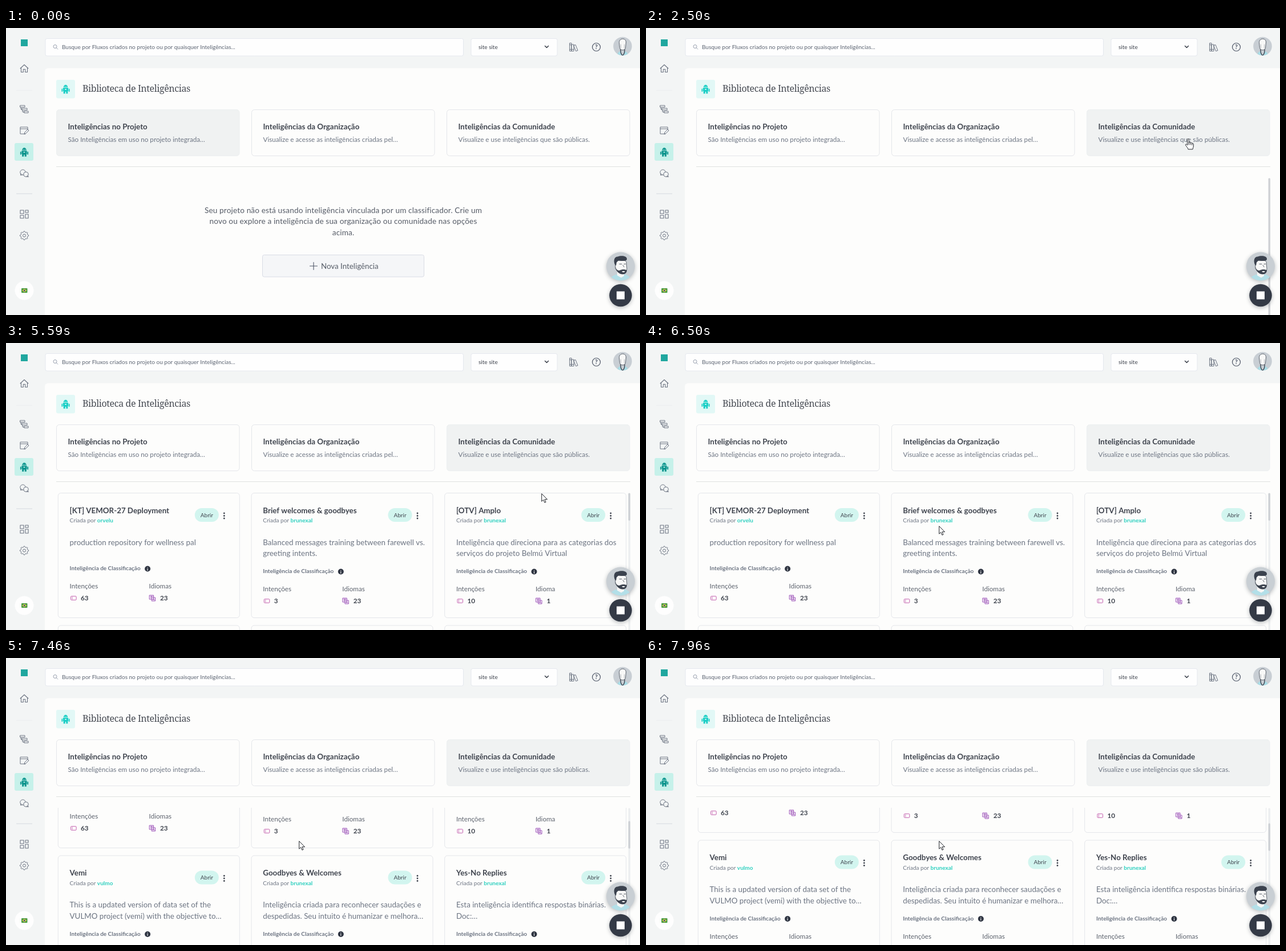
Write an HTML page with a canvas that moves like this. It is 1111 px wide and 504 px high and loops after 8 s.

```html
<!DOCTYPE html>
<html lang="pt-BR">
<head>
<meta charset="utf-8">
<title>Biblioteca de Inteligências</title>
<style>
html, body { margin: 0; width: 100%; height: 100%; overflow: hidden; background: #f3f5f5; }
canvas { display: block; width: 1111px; height: 504px; }
</style>
</head>
<body>
<canvas id="stage" width="1111" height="504"></canvas>
<script>
const ctx = document.getElementById('stage').getContext('2d');
const LOOP = 8000;
const LATO = 'Lato, "Open Sans", sans-serif';
const SERIF = '"Noto Serif", serif';
const INK = '#3f444e', SOFT = '#6c7482', LINE = '#e4e6ea';
const PAGE = '#fdfdfc', SIDE = '#f3f5f5', TEAL = '#1ccfc6';

const TABS = [
  [88, 'Inteligências no Projeto', 'São Inteligências em uso no projeto integrada…'],
  [430, 'Inteligências da Organização', 'Visualize e acesse as inteligências criadas pel…'],
  [772, 'Inteligências da Comunidade', 'Visualize e use inteligências que são públicas.']
];

const CARDS = [
  { title: '[KT] VEMOR-27 Deployment', by: 'orvelu', text: ['production repository for wellness pal'], intents: 63, langs: 23 },
  { title: 'Brief welcomes & goodbyes', by: 'brunexal', text: ['Balanced messages training between farewell vs.', 'greeting intents.'], intents: 3, langs: 23 },
  { title: '[OTV] Amplo', by: 'brunexal', text: ['Inteligência que direciona para as categorias dos', 'serviços do projeto Belmú Virtual'], intents: 10, langs: 1 },
  { title: 'Vemi', by: 'vulmo', text: ['This is a updated version of data set of the', 'VULMO project (vemi) with the objective to…'], intents: 12, langs: 2 },
  { title: 'Goodbyes & Welcomes', by: 'brunexal', text: ['Inteligência criada para reconhecer saudações e', 'despedidas. Seu intuito é humanizar e melhora…'], intents: 2, langs: 2 },
  { title: 'Yes-No Replies', by: 'brunexal', text: ['Esta inteligência identifica respostas binárias.', 'Doc:…'], intents: 2, langs: 2 }
];

const clamp = v => Math.min(1, Math.max(0, v));
const ramp = (t, a, b) => clamp((t - a) / (b - a));
const ease = p => p * p * (3 - 2 * p);
const mix = (a, b, p) => a + (b - a) * p;

function text(str, x, y, size, color, weight = 400, align = 'left', spacing = 0, family = LATO) {
  ctx.font = `${weight} ${size}px ${family}`;
  ctx.letterSpacing = spacing + 'px';
  ctx.textAlign = align;
  ctx.fillStyle = color;
  ctx.fillText(str, x, y);
  ctx.letterSpacing = '0px';
}

function paint(fill, stroke, width = 1) {
  if (fill) { ctx.fillStyle = fill; ctx.fill(); }
  if (stroke) { ctx.strokeStyle = stroke; ctx.lineWidth = width; ctx.stroke(); }
}

function box(x, y, w, h, r, fill, stroke, width) {
  ctx.beginPath();
  ctx.roundRect(x, y, w, h, r);
  paint(fill, stroke, width);
}

function disc(x, y, r, fill, stroke, width) {
  ctx.beginPath();
  ctx.arc(x, y, r, 0, Math.PI * 2);
  paint(fill, stroke, width);
}

function shape(d, x, y, fill, stroke, width) {
  ctx.save();
  ctx.translate(x, y);
  const p = new Path2D(d);
  if (fill) { ctx.fillStyle = fill; ctx.fill(p); }
  if (stroke) {
    ctx.strokeStyle = stroke;
    ctx.lineWidth = width || 1;
    ctx.lineJoin = ctx.lineCap = 'round';
    ctx.stroke(p);
  }
  ctx.restore();
}

function hline(x1, x2, y, color) {
  ctx.fillStyle = color;
  ctx.fillRect(x1, y, x2 - x1, 1);
}

function robot(x, y, color, back) {
  shape('M-3.7-3.2A3.7 4.6 0 0 1 3.7-3.2Z M-4.6-2.4H4.6V3.6H3.8V7.8H.8V4.6H-.8V7.8H-3.8V3.6H-4.6Z', x, y, color);
  shape('M-6.2 0V3.6 M6.2 0V3.6', x, y, null, color, 1.8);
  disc(x - 1.4, y - 4.7, 0.6, back);
  disc(x + 1.4, y - 4.7, 0.6, back);
  box(x - 1.5, y - 0.4, 3, 1.4, 0.5, back);
}

function gear(x, y) {
  ctx.beginPath();
  for (let i = 0; i < 32; i++) {
    const a = (i - 0.5) / 32 * Math.PI * 2, r = i % 4 < 2 ? 7.6 : 5.9;
    ctx.lineTo(x + Math.cos(a) * r, y + Math.sin(a) * r);
  }
  ctx.closePath();
  paint(null, SOFT);
  disc(x, y, 2.5, null, SOFT);
}

function sidebar() {
  box(26, 20, 12, 12, 0, '#20a79f');
  shape('M-7 0L0-6.5L7 0 M-5.5-1V6.5H-1.7V1.5H1.7V6.5H5.5V-1', 32, 71, null, SOFT, 1.1);
  hline(18, 46, 109, '#eceef0');
  shape('M-7-6.5H1V-3.5H-7Z M-4-1.5H5V1.5H-4Z M0 3.5H7V6.5H0Z M-6-3.5V0H-4 M-3 1.5V5H0', 32, 142.5, null, SOFT);
  shape('M2 6H-7V-6H6V-2 M-7-3H6 M0 6L1 3L6-2L8 0L3 5Z', 32, 180, null, SOFT);
  box(15, 202, 33, 31, 3, '#c6f1ea');
  robot(32, 218, '#0c958d', '#c6f1ea');
  disc(29.5, 253.5, 4.7, null, SOFT);
  shape('M-1 0L-1.5 3L2 1.8', 27, 255.5, null, SOFT);
  disc(35, 257, 4.1, SIDE, SOFT);
  shape('M0 0L2 2.3L-1.5 2', 37.5, 259, null, SOFT);
  hline(18, 46, 290.5, '#d6dae0');
  shape('M-7-7H-1V-1H-7Z M2-7H7V-3H2Z M2 0H7V7H2Z M-7 2H-1V7H-7Z', 32, 327, null, SOFT, 1.1);
  gear(32, 364.5);
  disc(32, 461, 16.5, '#fefefe');
  box(27, 457, 10.5, 8, 1, '#4b9b43');
  shape('M-4 0L0-3L4 0L0 3Z', 32.2, 461, '#e6cf45');
  disc(32.2, 461, 1.5, '#35558c');
}

function header() {
  box(69, 18.5, 732.5, 30.5, 3, '#fefefe', '#e5e8ee');
  disc(86, 32.5, 3, null, '#8d96a5', 0.9);
  shape('M0 0L2.5 2.5', 88.2, 34.7, null, '#8d96a5', 0.9);
  text('Busque por Fluxos criados no projeto ou por quaisquer Inteligências...', 98, 37, 10, '#5c6472');
  box(815, 18.5, 151, 30.5, 3, '#fefefe', '#e5e8ee');
  text('site site', 828, 37, 10, INK);
  shape('M-3-1.5L0 1.5L3-1.5', 947.5, 33, null, INK, 1.6);

  shape('M-7-7H-4V7H-7Z M-4-4.5H0V7H-4Z M0-3L3-4L7 6L4 7Z M-7 4H0 M-7-4H-4', 995, 33.5, null, SOFT);
  disc(1034.5, 33.5, 7, null, '#4e5666', 1.2);
  text('?', 1034.5, 37.3, 10.5, '#4e5666', 700, 'center');

  ctx.save();
  disc(1080.5, 32, 16.3, '#c8ced4');
  ctx.clip();
  shape('M-10 18C-9 10-5 8 0 8S9 10 10 18Z', 1080.5, 32, '#a8dbe4');
  shape('M-4 3H4L3 12L0 17L-3 12Z', 1080.5, 32, '#c9ced3', '#3b4350', 1.4);
  shape('M-6-7C-6-15 6-15 6-7L5 3C4 8-4 8-5 3Z', 1080.5, 32, '#f8f8f7', '#59616c', 1);
  shape('M-3-3V3 M3-3V3', 1080.5, 32, null, '#b4b9bf', 0.9);
  ctx.restore();
}

function tabs(active) {
  TABS.forEach(([x, title, note], i) => {
    const on = i === active;
    box(x + 0.5, 143.5, 320.5, 81, 5, on ? '#f0f2f2' : PAGE, on ? '#eceff0' : LINE);
    text(title, x + 20.5, 178, 13.33, INK, 700);
    text(note, x + 20.5, 200, 11.67, SOFT);
  });
  hline(88, 1094, 243, '#dfe2e0');
}

function emptyState(alpha) {
  if (alpha <= 0) return;
  ctx.globalAlpha = alpha;
  ['Seu projeto não está usando inteligência vinculada por um classificador. Crie um',
   'novo ou explore a inteligência de sua organização ou comunidade nas opções',
   'acima.'].forEach((s, i) => text(s, 591, 324.5 + i * 19.7, 13.6, '#565c67', 400, 'center', 0.14));
  box(449.5, 398.5, 283, 38.5, 3, '#f5f6f8', '#d9dce5');
  shape('M-6.5 0H6.5M0-6.5V6.5', 539, 418, null, '#4e5666', 1.1);
  text('Nova Inteligência', 552, 422.7, 13.33, '#565c67');
  ctx.globalAlpha = 1;
}

function stat(x, y, label, value, isLang) {
  text(label, x, y, 11.67, '#5d636e');
  const cy = y + 17;
  if (isLang) {
    shape('M-5-5H2V2H-5Z M-1-1H5V5H-1Z M-3.5-3H0.5 M-1.5-3.5L-3 0 M1 3.5L2 1L3.5 3.5', x + 6, cy, null, '#9b50b8');
  } else {
    box(x + 2, cy - 3.3, 9.5, 6.6, 1, null, '#c45fae');
    shape('M0-2V2', x + 4.5, cy, null, '#c45fae', 0.8);
  }
  text(value, x + 19.5, y + 21, 11.67, INK, 700);
}

function card(c, x, y) {
  box(x, y, 318, 219, 5, PAGE, LINE);
  const tx = x + 20.3, low = y + (c.text.length > 1 ? 5 : 0);
  text(c.title, tx, y + 35.3, 13.33, INK, 700);
  text('Criada por ', tx, y + 51.5, 10, SOFT);
  text(c.by, tx + ctx.measureText('Criada por ').width, y + 51.5, 10, '#2fd0c0', 700);
  box(x + 239.5, y + 26.5, 42, 24, 12, '#d2f5ef');
  text('Abrir', x + 260.5, y + 42, 10, INK, 400, 'center');
  [35.5, 40, 44.5].forEach(d => disc(x + 291, y + d, 1.4, INK));
  c.text.forEach((s, i) => text(s, tx, y + 91.2 + i * 19.6, 13.33, SOFT));

  text('Inteligência de Classificação', tx, low + 135.5, 10, SOFT, 700);
  disc(tx + 136.5, low + 133, 5, '#2f3542');
  text('i', tx + 136.5, low + 136, 8, '#fff', 700, 'center');
  stat(tx, low + 167.5, 'Intenções', c.intents, false);
  stat(tx + 139, low + 167.5, c.langs === 1 ? 'Idioma' : 'Idiomas', c.langs, true);
}

function cardList(alpha, scroll) {
  ctx.save();
  ctx.beginPath();
  ctx.rect(85, 263, 1026, 241);
  ctx.clip();
  ctx.globalAlpha = alpha;
  CARDS.forEach((c, i) => card(c, 91.3 + i % 3 * 338.7, 263.5 + Math.floor(i / 3) * 232.5 - scroll));
  ctx.restore();
}

function scrollbar(loaded, scroll) {
  box(1090.5, 263.5, 3.5, 250, 2, loaded ? '#edeff0' : '#d0d2d6');
  if (loaded) box(1090.5, 263.5 + scroll * 0.152, 3.5, 48.5, 2, '#cfd2d6');
}

function shadowDisc(x, y, r, fill) {
  ctx.save();
  ctx.shadowColor = 'rgba(40,50,60,.32)';
  ctx.shadowBlur = 7;
  ctx.shadowOffsetY = 2;
  disc(x, y, r, fill);
  ctx.restore();
}

function floaters() {
  shadowDisc(1077, 418.5, 25, '#c9cfd4');
  ctx.save();
  disc(1077, 418.5, 25);
  ctx.clip();
  shape('M-20 26C-17 17-11 15-5 14H7C14 16 17 20 19 26Z', 1077, 418.5, '#b3dfe8');
  shape('M-6 4H6V17L1 20L-6 16Z', 1077, 418.5, '#f6f6f5');
  shape('M-9-8C-4-12 7-12 10-8L11 5C9 14-4 14-9 4Z', 1077, 418.5, '#f8f8f7', '#454c58', 0.8);
  shape('M-10-3C-13-10-11-17-5-17C0-19 11-19 11-13C11-9 6-9-4-10L-7-7L-8-1Z', 1077, 418.5, '#3b424e');
  shape('M-9 0C-8 6-5 8-1 7C2 5 8 5 11 7C11 11 8 14 4 14C-3 14-9 8-9 0Z', 1077, 418.5, '#3b424e');
  shape('M2 9C4 8 6 8 8 9C6 11 4 11 2 9Z', 1077, 418.5, '#f8f8f7');
  shape('M-2-4H2 M6-4H9 M4-2L6 1', 1077, 418.5, null, '#454c58', 0.9);
  ctx.restore();
  shadowDisc(1077, 469.5, 19.8, '#343a46');
  box(1070, 462.5, 14, 14, 0, '#fdfdfd');
}

function arrow(x, y) {
  shape('M0 0V13.2L3 10.4L5.2 15.3L7.3 14.4L5.2 9.7H9.4Z', x + 0.7, y, '#fff', '#22252b', 1);
}

function hand(x, y) {
  shape('M-1.5 1C-1.5-1 1.2-1 1.2 1V6.5C1.4 5 4 5 4 7C4.5 5.7 6.8 6 6.8 7.8C7.5 6.9 9.3 7.3 9.3 9V13C9.3 15 8 16 8 18H0C0 16-3 13-4.5 10.8C-5.2 9.3-3.5 8.4-2.5 9.5L-1.5 10.6Z M1.2 6.5V10 M4 7V10 M6.8 8V10.5', x, y, '#fff', '#22252b', 1);
}

function cursor(t) {
  if (t < 40) return;
  let x, y;
  if (t < 3750) {
    const p = ease(ramp(t, 0, 1040));
    x = mix(720, 950, p);
    y = mix(508, 194.5, p);
  } else if (t < 6000) {
    const p = ease(ramp(t, 3750, 3960));
    x = mix(950, 938, p);
    y = mix(194.5, 265, p);
  } else {
    const p = ease(ramp(t, 6210, 6470));
    x = mix(938, 513, p);
    y = mix(265, 322, p);
  }
  (y < 225 ? hand : arrow)(Math.round(x), Math.round(y));
}

function draw(t) {
  const picked = t >= 1590;
  const loaded = t >= 5250;
  const scroll = t < 6994 ? 0 : Math.round(181 * (1 - Math.exp((6994 - t) / 269)));

  ctx.fillStyle = SIDE;
  ctx.fillRect(0, 0, 1111, 504);
  box(68, 70.5, 1060, 460, [6, 0, 0, 0], PAGE);
  sidebar();
  header();

  box(88, 91, 33, 32.5, 3, '#e2f8f6');
  robot(104.5, 107.5, TEAL, '#e2f8f6');
  text('Biblioteca de Inteligências', 134, 111.7, 16, '#484c54', 400, 'left', -0.4, SERIF);
  tabs(picked ? 2 : 0);

  emptyState(1 - ramp(t, 1750, 1960));
  if (loaded) cardList(ramp(t, 5210, 5500), scroll);
  if (t >= 1750) scrollbar(loaded, scroll);
  floaters();
  cursor(t);
}

const start = performance.now();
function tick() {
  draw((performance.now() - start) % LOOP);
  requestAnimationFrame(tick);
}
tick();
</script>
</body>
</html>
```
